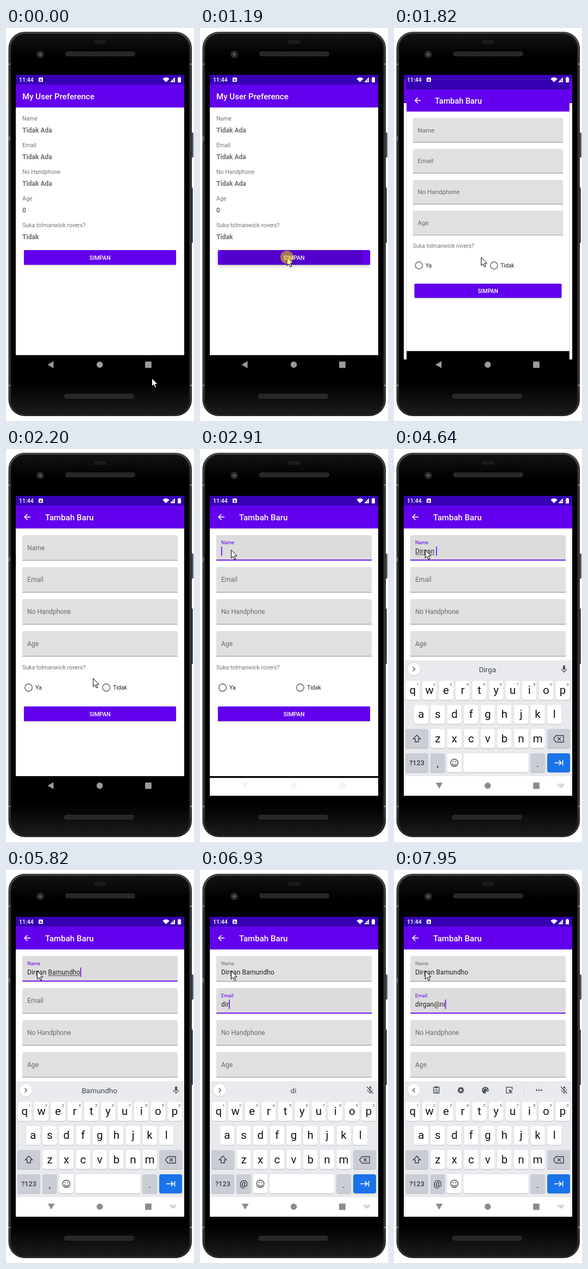
Write an HTML page with a canvas that moves like this. It is 346 by 722 pixels and loops after 8 s.

```html
<!DOCTYPE html>
<html lang="id">
<head>
<meta charset="utf-8">
<title>My User Preference</title>
<style>
html, body { margin: 0; width: 100%; height: 100%; overflow: hidden; background: #fff; }
canvas { display: block; width: 346px; height: 722px; font-family: Roboto, sans-serif; }
</style>
</head>
<body>
<canvas id="stage"></canvas>
<script>
const canvas = document.getElementById('stage');
const c = canvas.getContext('2d');
const dpr = window.devicePixelRatio || 1;
canvas.width = 346 * dpr;
canvas.height = 722 * dpr;

const LOOP = 8000, PURPLE = '#6200ee', DARK = '#3700b3', ICON = '#505357';
const NAME = 'Dirgan Bamundho', EMAIL = 'dirgan@ni', QUESTION = 'Suka tolmanwick rovers?';
const nameKeys = [3620, 3770, 4000, 4160, 4390, 4640, 4640, 4800, 4880, 4950, 5030, 5180, 5350, 5520, 5740];
const mailKeys = [6460, 6690, 6930, 7170, 7320, 7550, 7710, 7780, 7950];
const FOCUS_NAME = 2740, FOCUS_MAIL = 5990;
const mousePath = [[35, 268, 643], [410, 163, 407], [600, 163, 407], [640, 160, 415],
  [840, 160, 415], [870, 160, 421], [2200, 160, 421], [2520, 57, 185]];

const ramp = (t, a, b) => Math.min(1, Math.max(0, (t - a) / (b - a)));
const smooth = x => x * x * (3 - 2 * x);
const mix = (a, b, p) => a + (b - a) * p;
const typed = (text, keys, t) => text.slice(0, keys.filter(k => k <= t).length);

function box(x, y, w, h, color, r = 0) {
  c.fillStyle = color;
  c.beginPath();
  c.roundRect(x, y, w, h, r);
  c.fill();
}
function disc(x, y, r, color) {
  c.fillStyle = color;
  c.beginPath();
  c.arc(x, y, r, 0, 7);
  c.fill();
}
function ring(x, y, r, color, width) {
  c.strokeStyle = color;
  c.lineWidth = width;
  c.beginPath();
  c.arc(x, y, r, 0, 7);
  c.stroke();
}
function trace(points) {
  c.beginPath();
  for (let i = 0; i < points.length; i += 2) c.lineTo(points[i], points[i + 1]);
}
function poly(color, ...points) {
  trace(points);
  c.fillStyle = color;
  c.fill();
}
function line(color, width, ...points) {
  trace(points);
  c.strokeStyle = color;
  c.lineWidth = width;
  c.stroke();
}
function text(s, x, y, size, color, weight = 400, align = 'left', spacing = 0) {
  c.font = `${weight} ${size}px Roboto, sans-serif`;
  c.letterSpacing = spacing + 'px';
  c.textAlign = align;
  c.fillStyle = color;
  c.fillText(s, x, y);
  return c.measureText(s).width;
}
function layer(draw) {
  c.save();
  draw();
  c.restore();
}
function clip(x, y, w, h, r = 0) {
  c.beginPath();
  c.roundRect(x, y, w, h, r);
  c.clip();
}
function shade(color, blur, dy) {
  c.shadowColor = color;
  c.shadowBlur = blur * dpr;
  c.shadowOffsetY = dy * dpr;
}
function fade(y0, y1, ...stops) {
  const g = c.createLinearGradient(0, y0, 0, y1);
  for (const [at, color] of stops) g.addColorStop(at, color);
  return g;
}

function grill(x, y) {
  box(x, y, 129, 9, '#2b2b2d', 4.5);
  for (let i = 0; i < 42; i++)
    for (let j = 0; j < 2; j++) box(x + 3 + i * 3 + j * 1.5, y + 2.5 + j * 3, 1.3, 1.3, '#161617');
}

function phone() {
  box(340, 192, 5, 46, '#57585a', 1.5);
  box(340, 293, 4, 102, '#4a4b4d', 1.5);
  box(4.5, 7, 337.5, 706, '#1d1d1f', 30);
  box(5.5, 8, 335.5, 704, fade(8, 712, [0, '#505153'], [.07, '#3a3b3d'], [.93, '#3a3b3d'], [1, '#2c2c2e']), 29);
  for (const x of [4.5, 338]) {
    box(x, 65, 4, 3, '#77787a');
    box(x, 655, 4, 3, '#77787a');
  }
  box(4, 199, 3, 8, '#77787a');
  box(8, 10, 330.5, 700, '#161617', 27);
  box(10, 12, 326.5, 696, fade(12, 708, [0, '#121213'], [.06, '#000'], [.92, '#000'], [1, '#1b1b1c']), 25);
  disc(63, 48.5, 7, '#242527');
  disc(63, 48.5, 4.5, '#303236');
  disc(63, 48.5, 2, '#63676e');
  box(162, 22, 22, 7, '#1b1b1d', 2);
  grill(109, 43);
  grill(107, 672);
}

function statusIcons() {
  text('11:44', 24, 99, 10.56, '#fff', 500);
  box(60, 91, 8, 8, '#fff', 1);
  text('A', 64, 97.6, 7, DARK, 700, 'center');
  c.fillStyle = '#fff';
  c.beginPath();
  c.moveTo(294.5, 99.5);
  c.arc(294.5, 99, 8.2, -Math.PI * .77, -Math.PI * .23);
  c.fill();
  poly('#fff', 302, 99.5, 311, 99.5, 311, 90.5);
  poly(DARK, 307, 97, 309.4, 97, 309.4, 94.4);
  box(316, 91, 6, 9, '#fff', 1);
  box(317.7, 90, 2.6, 2, '#fff');
}

function windowBase(title, x) {
  box(18, 86, 310, 551, '#000');
  box(18, 104, 310, 497, '#fff');
  box(18, 104, 310, 42, PURPLE);
  box(18, 86, 310, 18, DARK);
  text(title, x, 131, 15.09, '#fff', 500);
}

function saveButton(y, lift = 0) {
  layer(() => {
    shade('rgba(0,0,0,.3)', 2 + lift * 3, .8 + lift);
    box(33, y, 280, 27, PURPLE, 1.5);
  });
}
const saveLabel = y => text('SIMPAN', 173, y + 17.7, 10.56, '#fff', 500, 'center');

function mainScreen(t) {
  windowBase('My User Preference', 30);
  const rows = [['Name', 'Tidak Ada'], ['Email', 'Tidak Ada'], ['No Handphone', 'Tidak Ada'],
    ['Age', '0'], [QUESTION, 'Tidak']];
  rows.forEach(([label, value], i) => {
    text(label, 30, 169.7 + i * 49, 10.56, '#757575');
    text(value, 30, 191.8 + i * 49, 12.07, '#707070', 700);
  });
  const press = ramp(t, 870, 1000) * (1 - ramp(t, 1300, 1420));
  saveButton(408, press);
  if (press > 0) layer(() => {
    clip(33, 408, 280, 27, 1.5);
    const grow = ramp(t, 870, 1230);
    disc(mix(160, 171, grow), 421.5, 146 * grow, `rgba(0,0,0,${.15 * press})`);
  });
  saveLabel(408);
}

function field(i, label, value, lift, focused, underline) {
  const top = 158.2 + 58.75 * i;
  box(30, top, 286, 46.5, focused ? '#dcdcdc' : '#e0e0e0', [3, 3, 0, 0]);
  box(30, top + (focused ? 45 : 45.7), 286, focused ? 1.7 : 1, focused ? PURPLE : '#8c8c8c');
  text(label, 39, top + mix(27.3, 17, lift), mix(12.07, 9.05, lift), focused ? PURPLE : '#6a6a6a');
  const w = text(value, 39, top + 34, 12.07, '#222', 400, 'left', .113);
  if (underline) {
    const head = c.measureText(value.slice(0, underline[0])).width;
    const tail = c.measureText(value.slice(0, underline[1])).width;
    box(39 + head, top + 35.3, tail - head, 1, '#444');
  }
  if (focused && lift > .8) box(39 + w, top + 21, 1.5, 17, PURPLE);
}

function formScreen(t) {
  windowBase('Tambah Baru', 72);
  line('#fff', 1.6, 45, 125, 34.5, 125);
  line('#fff', 1.6, 39.5, 119.8, 34.2, 125, 39.5, 130.2);
  const name = typed(NAME, nameKeys, t), mail = typed(EMAIL, mailKeys, t);
  const inMail = t >= FOCUS_MAIL;
  const word = inMail || !name ? null : t < 4720 ? [0, Math.min(6, name.length)] : [7, name.length];
  field(0, 'Name', name, ramp(t, FOCUS_NAME, 2890), t >= FOCUS_NAME && !inMail, word);
  field(1, 'Email', mail, ramp(t, FOCUS_MAIL, 6140), inMail);
  field(2, 'No Handphone', '', 0);
  field(3, 'Age', '', 0);
  text(QUESTION, 30, 404.8, 10.56, '#757575');
  [['Ya', 41.5], ['Tidak', 184.5]].forEach(([label, x]) => {
    ring(x, 438.3, 6.8, '#666', 1.5);
    text(label, x + 12.5, 442, 10.56, '#222');
  });
  saveButton(473);
  saveLabel(473);
}

function key(x, y, w, color = '#fff') {
  layer(() => {
    shade('rgba(0,0,0,.25)', .8, .8);
    box(x, y, w, 35, color, 4);
  });
}

function mic(off) {
  box(310.8, 397.5, 4.4, 8.5, ICON, 2.2);
  c.strokeStyle = ICON;
  c.lineWidth = 1.3;
  c.beginPath();
  c.arc(313, 403.8, 4.7, 0, Math.PI);
  c.stroke();
  line(ICON, 1.4, 313, 408, 313, 411);
  if (off) {
    line('#e8eaed', 1.5, 308.5, 397, 319.5, 409);
    line(ICON, 1.4, 307, 398, 318.5, 410.5);
  }
}

function toolIcons() {
  c.strokeStyle = ICON;
  c.lineWidth = 1.4;
  c.strokeRect(73, 399, 10, 11);
  box(75.5, 397.5, 5, 3.5, ICON, 1);
  for (const y of [403, 405.3, 407.6]) box(75, y, 6, 1, ICON);
  for (let i = 0; i < 8; i++) {
    const a = i * Math.PI / 4;
    line(ICON, 2.6, 123, 404.5, 123 + 6 * Math.cos(a), 404.5 + 6 * Math.sin(a));
  }
  disc(123, 404.5, 4.7, ICON);
  disc(123, 404.5, 2.1, '#e8eaed');
  disc(168, 404.5, 6.3, ICON);
  for (const [x, y] of [[-3.8, -.5], [-1.6, -3.3], [1.6, -3.3], [3.8, -.5]]) disc(168 + x, 404.5 + y, 1, '#e8eaed');
  disc(171, 409, 2.5, '#e8eaed');
  line(ICON, 1.4, 212, 409.8, 206.7, 409.8, 206.7, 399, 217.5, 399, 217.5, 404);
  poly(ICON, 211, 403, 218.5, 406, 215.5, 407.2, 218, 410, 216.8, 411, 214.5, 408.5, 213.5, 411);
  box(239, 396, 1, 17, '#d3d6da');
  for (const x of [262.5, 267, 271.5]) disc(x, 404.5, 1.5, ICON);
}

function keyboard(t) {
  box(18, 388, 310, 213, '#e8eaed');
  box(18, 601, 310, 36, '#fff');
  const inMail = t >= FOCUS_MAIL;
  const suggest = t >= 3770 && t < FOCUS_MAIL || t >= 6690 && t < 7740;
  layer(() => {
    shade('rgba(0,0,0,.2)', 1.5, .5);
    disc(36.5, 404.5, 11.3, '#fff');
  });
  const d = suggest ? 2 : -2;
  line(ICON, 1.4, 36.5 - d, 400.7, 36.5 + d, 404.5, 36.5 - d, 408.3);
  if (suggest) {
    const late = t - 75;
    const word = inMail ? typed(EMAIL, mailKeys, late).split('@')[0] : typed(NAME, nameKeys, late).split(' ').pop();
    text(word, 172, 409.7, 13.6, '#45484c', 400, 'center');
  } else toolIcons();
  mic(inMail);

  [['qwertyuiop', 34.4, 426], ['asdfghjkl', 49.8, 470.3], ['zxcvbnm', 80.5, 514.6]].forEach(([letters, x0, y], row) => {
    [...letters].forEach((ch, i) => {
      const x = x0 + i * 30.68;
      key(x - 13.2, y, 26.4);
      text(ch, x, y + 24, 20.5, '#111214', 400, 'center');
      if (!row) text((i + 1) % 10, x + 9, y + 9, 8, '#5f6368', 400, 'center');
    });
  });
  const gray = '#cacdd5';
  key(21, 514.6, 42, gray);
  key(282, 514.6, 42, gray);
  key(21, 559, 42, gray);
  key(67, 559, 27, gray);
  key(97.5, 559, 27);
  key(128, 559, 119);
  key(251, 559, 27, gray);
  key(282, 559, 42, '#1a73e8');
  // shift and backspace
  line('#3c4043', 1.4, 42, 525.5, 35.5, 532.5, 39, 532.5, 39, 538, 45, 538, 45, 532.5, 48.5, 532.5, 42, 525.5);
  line('#3c4043', 1.4, 293.5, 532.5, 298, 526.5, 312, 526.5, 312, 538.5, 298, 538.5, 293.5, 532.5);
  line('#3c4043', 1.4, 301, 529.5, 307, 535.5);
  line('#3c4043', 1.4, 307, 529.5, 301, 535.5);
  text('?123', 42, 581.2, 12.6, '#3c4043', 500, 'center');
  text(inMail ? '@' : ',', 80.5, inMail ? 582 : 584, 17, '#202124', 400, 'center');
  text('.', 264.5, 584, 17, '#202124', 400, 'center');
  ring(111, 576.5, 6.8, '#3c4043', 1.3);
  disc(108.6, 574.5, 1.1, '#3c4043');
  disc(113.4, 574.5, 1.1, '#3c4043');
  c.beginPath();
  c.arc(111, 577, 3.7, .15, Math.PI - .15);
  c.stroke();
  line('#fff', 1.6, 295, 576.5, 308, 576.5);
  line('#fff', 1.6, 303.5, 572, 308, 576.5, 303.5, 581);
  line('#fff', 1.6, 310.5, 571.5, 310.5, 581.5);
}

function navIcons(t) {
  const ime = t >= 2870;
  const color = ime ? (t < 3050 ? '#f3f3f3' : '#8c8c8c') : '#9b9b9b';
  if (ime) poly(color, 77, 613, 89.5, 613, 83.2, 624);
  else poly(color, 76.5, 618.5, 87.5, 612, 87.5, 625);
  disc(172.5, 618.5, 5.7, color);
  box(256, 612.7, 11.8, 11.8, color, 1);
  if (t < 3050) return;
  for (let i = 0; i < 5; i++)
    for (let j = 0; j < 2; j++) box(301.5 + i * 2.4, 615 + j * 2.3, 1.5, 1.4, '#a8a8a8');
  box(304, 619.8, 6.5, 1.3, '#a8a8a8');
}

function zoomed(k, alpha, draw) {
  layer(() => {
    c.globalAlpha = alpha;
    c.translate(173, 372);
    c.scale(k, k);
    c.translate(-173, -372);
    draw();
  });
}

function screen(t) {
  clip(18, 86, 310, 551);
  const p = t < 1720 ? 0 : t > 2250 ? 1 : 1 - Math.exp((1700 - t) / 80);
  if (p < 1) zoomed(1 + .045 * p, 1, () => mainScreen(t));
  if (p > 0) zoomed(.85 + .15 * p, ramp(t, 1690, 1790), () => formScreen(t));
  statusIcons();
  if (t > 2820) layer(() => {
    c.translate(0, 249 * (1 - smooth(ramp(t, 2820, 3220))));
    if (t < 2960) box(18, 388, 310, 249, '#fff');
    else keyboard(t);
  });
  navIcons(t);
}

function mouse(t) {
  let i = 0;
  while (i < mousePath.length - 2 && t > mousePath[i + 1][0]) i++;
  const [ta, xa, ya] = mousePath[i], [tb, xb, yb] = mousePath[i + 1];
  const p = smooth(ramp(t, ta, tb)), x = mix(xa, xb, p), y = mix(ya, yb, p);
  layer(() => {
    c.translate(x, y);
    poly('#fff', .5, .5, .5, 15.5, 4, 12.3, 6.5, 18, 8.9, 17, 6.4, 11.4, 11, 11.2);
    c.closePath();
    c.strokeStyle = '#000';
    c.lineWidth = 1;
    c.stroke();
  });
  if (t >= 870 && t < 1340 || t >= 2600 && t < 2830) disc(x, y, 12, 'rgba(255,230,0,.5)');
}

function frame() {
  const t = performance.now() % LOOP;
  c.setTransform(dpr, 0, 0, dpr, 0, 0);
  box(0, 0, 346, 722, '#fff');
  phone();
  layer(() => screen(t));
  mouse(t);
  requestAnimationFrame(frame);
}
frame();
</script>
</body>
</html>
```
